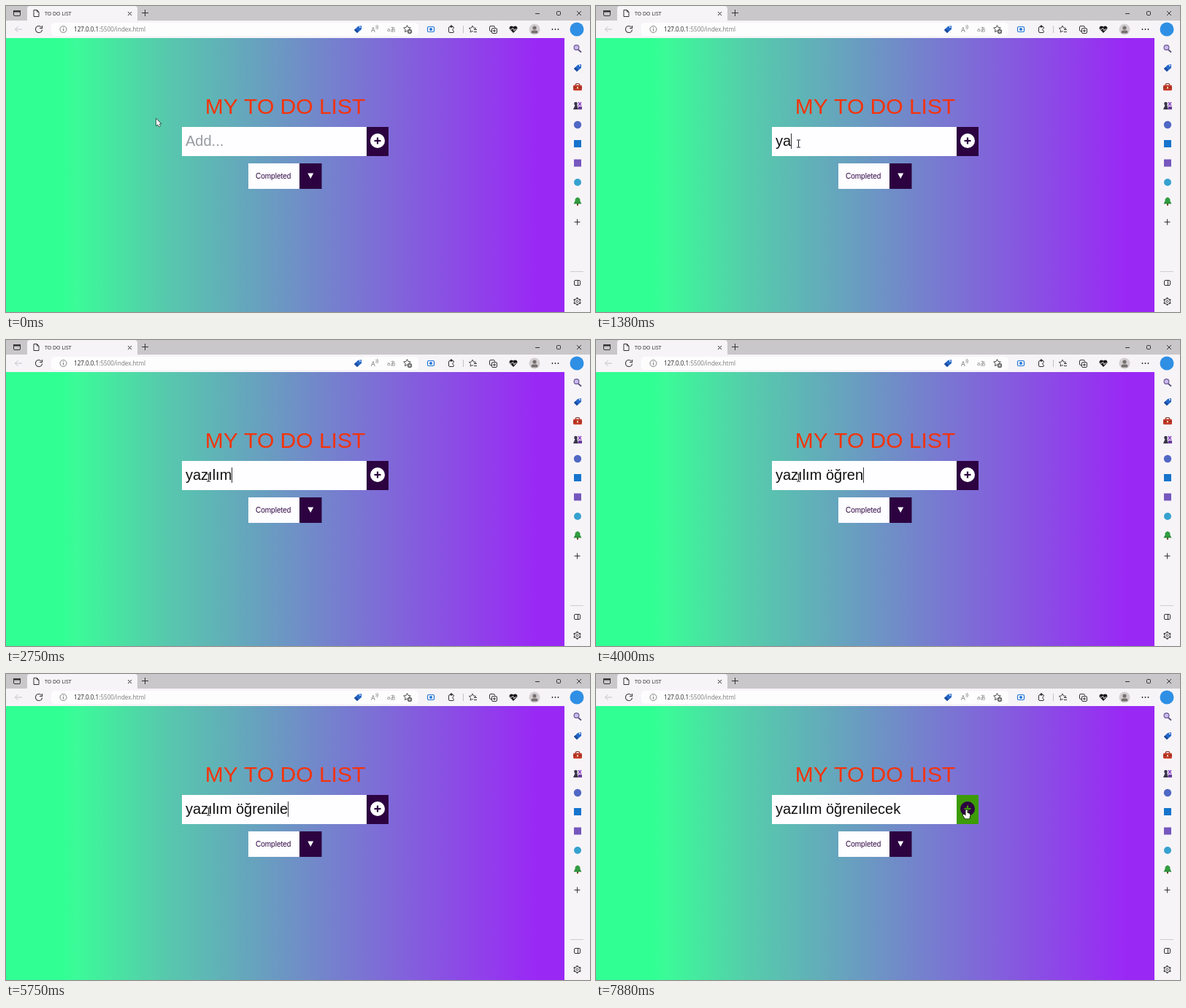
These frames come from a looping animation (800x420 px, 8000 ms). An HTML page with a canvas:

```html
<!DOCTYPE html>
<html lang="en">
<head>
<meta charset="utf-8">
<title>To do list</title>
<style>
html, body { margin: 0; width: 100%; height: 100%; overflow: hidden; }
canvas { display: block; width: 800px; height: 420px; }
</style>
</head>
<body>
<canvas id="stage" width="800" height="420"></canvas>
<script>
const ctx = document.getElementById('stage').getContext('2d');
const LOOP = 8000;
const SANS = '"Liberation Sans", Arial, sans-serif';
const UI = '"Open Sans", "Noto Sans", sans-serif';
const DARK = '#2c0340', INK = '#333', BAR = '#f7f4f8', GREEN = '#3d9b08';
const PHRASE = 'yazılım öğrenilecek';

// [time, typed length]
const KEYS = [[0, 0], [1250, 1], [1380, 2], [1500, 3], [1630, 4], [2380, 5], [2500, 6],
  [2750, 7], [3000, 8], [3500, 9], [3630, 10], [3750, 12], [4000, 13], [4630, 14],
  [5380, 15], [5750, 16], [6000, 17], [6130, 18], [6250, 19]];
const FOCUS = 1000;

function rect(x, y, w, h, color) {
  ctx.fillStyle = color;
  ctx.fillRect(x, y, w, h);
}
function box(x, y, w, h, r, color) {
  ctx.beginPath();
  ctx.roundRect(x, y, w, h, r);
  ctx.fillStyle = color;
  ctx.fill();
}
function frame(x, y, w, h, r, color = INK, lw = 1) {
  ctx.beginPath();
  ctx.roundRect(x, y, w, h, r);
  stroke(color, lw);
}
function stroke(color, lw) {
  ctx.strokeStyle = color;
  ctx.lineWidth = lw;
  ctx.stroke();
}
function disc(x, y, r, color) {
  ctx.beginPath();
  ctx.arc(x, y, r, 0, 7);
  ctx.fillStyle = color;
  ctx.fill();
}
function ring(x, y, r, color = INK, lw = 1, from = 0, to = Math.PI * 2) {
  ctx.beginPath();
  ctx.arc(x, y, r, from, to);
  stroke(color, lw);
}
function trace(pts, close) {
  ctx.beginPath();
  for (let i = 0; i < pts.length; i += 2) ctx.lineTo(pts[i], pts[i + 1]);
  if (close) ctx.closePath();
}
function line(pts, color = INK, lw = 1) {
  trace(pts);
  stroke(color, lw);
}
function poly(pts, color) {
  trace(pts, true);
  ctx.fillStyle = color;
  ctx.fill();
}
function text(s, x, y, size, color, family = SANS) {
  ctx.font = size + 'px ' + family;
  ctx.fillStyle = color;
  ctx.fillText(s, x, y);
  return ctx.measureText(s).width;
}
function plus(x, y, r, color = INK, lw = 1) {
  line([x - r, y, x + r, y], color, lw);
  line([x, y - r, x, y + r], color, lw);
}
function cross(x, y, r) {
  line([x - r, y - r, x + r, y + r]);
  line([x - r, y + r, x + r, y - r]);
}
function star(x, y, r) {
  const pts = [];
  for (let i = 0; i < 10; i++) {
    const a = i * Math.PI / 5 - Math.PI / 2, d = i % 2 ? r * 0.5 : r;
    pts.push(x + d * Math.cos(a), y + d * Math.sin(a));
  }
  trace(pts, true);
  stroke(INK, 0.9);
}
function tag(x, y) {
  poly([x - 5, y + 1, x, y - 4, x + 5, y - 5, x + 5, y, x - 1, y + 5], '#2468c8');
  poly([x - 5, y + 1, x - 3, y - 1, x + 1, y + 3, x - 1, y + 5], '#1c4a9a');
  disc(x + 3, y - 3, 0.9, '#fff');
}

function drawTabs() {
  rect(0, 0, 800, 20, '#cac7cb');
  box(29, 0, 151, 24, [4, 4, 0, 0], BAR);
  rect(0, 20, 800, 24, BAR);
  frame(10.5, 6.5, 9, 7, 1.5);
  rect(10, 6, 10, 2.5, INK);
  trace([38, 5.5, 42.5, 5.5, 45, 8, 45, 14.5, 38, 14.5], true);
  stroke(INK, 1);
  line([42.5, 5.5, 42.5, 8, 45, 8]);
  text('TO DO LIST', 53, 12.7, 7, '#222', UI);
  cross(169.5, 10.5, 2.5);
  plus(190.5, 9.5, 4.5);
  line([725, 10.5, 731, 10.5]);
  frame(754.5, 7.5, 5, 5, 1);
  cross(785, 10, 3);
}

function drawToolbar() {
  line([22, 32, 12.5, 32], '#c4c1c6');
  line([16.5, 28, 12.5, 32, 16.5, 36], '#c4c1c6');
  ring(45, 32, 4.5, INK, 1.1, 0.1, 5.5);
  line([49.5, 27, 49.5, 30.5, 46, 30.5], INK, 1.1);

  box(62, 23, 503, 18, 5, '#fefdfe');
  ring(78.5, 32, 4.5, '#777', 0.9);
  line([78.5, 31, 78.5, 34.5], '#777');
  rect(78, 29, 1, 1, '#777');
  const w = text('127.0.0.1', 93, 35, 8.1, '#222', UI);
  text(':5500/index.html', 93 + w, 35, 8.1, '#777', UI);

  tag(482, 32);
  text('A', 500, 35.5, 9, '#777', UI);
  ring(505, 29, 2.5, '#777', 0.8, -1, 1);
  ring(505, 29, 4.5, '#777', 0.8, -0.8, 0.8);
  text('aあ', 522, 35, 7.5, '#777', '"Open Sans", "Noto Sans CJK JP", sans-serif');
  star(549.5, 31.5, 5);
  disc(553, 35, 3.2, '#666');
  plus(553, 35, 1.7, '#fff', 0.8);

  frame(577.5, 28.5, 9, 7, 1.5, '#2176d8', 1.2);
  disc(582, 32, 2, '#2176d8');
  frame(606.5, 28.5, 7, 8, 1.5);
  disc(610, 28, 1.7, INK);
  disc(613.5, 32.5, 2.2, BAR);
  ring(613.5, 32.5, 1.7, INK, 1, 1.6, 4.7);
  line([626.5, 27, 626.5, 37], '#c4c1c6');
  star(639, 32, 5);
  rect(640, 32, 6, 5, BAR);
  line([641, 32.5, 645, 32.5]);
  line([641, 35.5, 645, 35.5]);
  frame(662.5, 27.5, 7, 7, 1.5);
  box(665, 29.5, 8, 8, 1.5, BAR);
  frame(665.5, 30.5, 7, 7, 1.5);
  plus(669, 34, 2);
  disc(692.5, 30.3, 2.9, '#171717');
  disc(697.5, 30.3, 2.9, '#171717');
  poly([689.8, 31.5, 700.2, 31.5, 695, 37], '#171717');
  line([690, 32, 693, 32, 694.5, 30, 696, 34, 697, 32, 700, 32], '#fff', 0.8);
  disc(724, 32, 7.5, '#d2ced1');
  disc(724, 30, 2.6, '#77706f');
  box(719.5, 33.5, 9, 4, [3, 3, 2, 2], '#77706f');
  for (const x of [748.5, 752.5, 756.5]) disc(x, 32, 0.9, '#222');
}

function drawSidebar() {
  rect(765, 44, 35, 376, BAR);
  disc(782, 32, 9.5, '#2f8fe4');

  line([784, 60, 788, 63.5], '#59507a', 1.8);
  disc(781.5, 57, 3.4, '#c9b9ee');
  ring(781.5, 57, 3.4, '#6b5a94', 1.2);
  tag(783, 85);
  frame(780.5, 106.5, 5, 4, 1, '#7d3025', 1.2);
  box(777, 108.5, 12, 7.5, 1.5, '#c63c2c');
  rect(777, 111.5, 12, 1, '#7d2418');
  rect(782, 111, 2, 2.5, '#f1c6a0');
  disc(780.5, 134, 2.3, '#39354a');
  poly([780, 135, 782, 135, 784, 142, 777, 142], '#39354a');
  line([784, 132, 788, 137], '#8a4ac4', 1.6);
  line([788, 132, 784, 137], '#8a4ac4', 1.6);
  rect(784, 138, 5, 4, '#6a3d9b');

  disc(783, 163, 5.2, '#5068c4');
  rect(778, 184, 10, 10, '#1674cc');
  rect(778, 210.5, 10, 10, '#7557bd');
  disc(783, 242, 5, '#36a2cf');

  rect(782, 269, 2, 5, '#7a4b27');
  poly([783, 262, 788.5, 271.5, 777.5, 271.5], '#278c36');
  disc(783, 266.5, 3.5, '#329d40');

  plus(782.5, 296.5, 4);
  line([773, 364.5, 791, 364.5], '#d0cdd1');
  frame(778.5, 376.5, 8, 7, 1.5);
  line([783.5, 376.5, 783.5, 383.5]);
  ring(782.5, 405.5, 4, INK, 1);
  for (let i = 0; i < 6; i++) {
    const c = Math.cos(i * Math.PI / 3 + 0.52), s = Math.sin(i * Math.PI / 3 + 0.52);
    line([782.5 + 4 * c, 405.5 + 4 * s, 782.5 + 5.5 * c, 405.5 + 5.5 * s], INK, 1.8);
  }
  ring(782.5, 405.5, 1.5, INK, 0.9);
}

function drawPage() {
  const g = ctx.createLinearGradient(0, 0, 765, 0);
  g.addColorStop(0.1, '#30ff94');
  g.addColorStop(0.125, '#3bfb98');
  g.addColorStop(0.27, '#55cdab');
  g.addColorStop(0.95, '#9a28f5');
  rect(0, 44, 765, 376, g);
  ctx.textAlign = 'center';
  text('MY TO DO LIST', 382.5, 147.5, 30, '#f5330a');
  ctx.textAlign = 'left';
  rect(332, 216, 70, 35, '#fefdff');
  rect(402, 216, 30.5, 35, DARK);
  text('Completed', 342, 237, 10, DARK);
  poly([413.3, 229.5, 421.2, 229.5, 417.2, 237], '#fff');
}

function drawInput(t, hover) {
  const [last, count] = KEYS.filter(k => k[0] <= t).pop();
  rect(241, 166, 253, 40, '#fefdff');
  let w = 0;
  if (count) w = text(PHRASE.slice(0, count), 246, 192.3, 20, '#111');
  else text('Add...', 246, 192.3, 20, '#969b9f');
  const since = t - Math.max(last, FOCUS);
  if (since >= 0 && since % 1000 < 500) rect(Math.floor(246 + w), 175, 1, 21, '#333');

  const back = hover ? GREEN : DARK;
  rect(494, 166, 30, 40, back);
  disc(509, 185, 10, hover ? DARK : '#fff');
  plus(509, 185, 4.5, back, 2.2);
}

function pointer(t) {
  const lerp = (a, b, p) => a + (b - a) * p;
  const ease = p => p * p * (3 - 2 * p);
  if (t < 7130) {
    const p = t < 250 ? 0 : ease(Math.min(1, (Math.floor((t - 250) / 125) + 1) / 3));
    return [lerp(206, 277, p), lerp(155, 189, p)];
  }
  const p = ease(Math.min(1, (Math.floor((t - 7130) / 125) + 1) / 7));
  return [lerp(277, 507.5, p), lerp(189, 186.5, p)];
}

function drawPointer(x, y, hover) {
  ctx.save();
  ctx.translate(x, y);
  if (hover) {
    trace([-1, 0, 1, 0, 1, 4, 4, 5, 5, 7, 4, 12, -2, 12, -5, 7, -3.5, 6, -1, 8], true);
    stroke('#111', 1.6);
    ctx.fillStyle = '#fff';
    ctx.fill();
  } else if (x > 241 && y > 166) {
    line([0.5, -4.5, 0.5, 4.5], '#222');
    line([-2, -5, 3, -5], '#222');
    line([-2, 5, 3, 5], '#222');
  } else {
    trace([0, 0, 0, 9, 2, 7.3, 3.5, 10.5, 5, 9.8, 3.7, 6.7, 6.2, 6.5], true);
    stroke('#222', 1.2);
    ctx.fillStyle = '#fff';
    ctx.fill();
  }
  ctx.restore();
}

function draw(now) {
  const t = now % LOOP;
  const [x, y] = pointer(t);
  const hover = x >= 494;
  drawPage();
  drawTabs();
  drawToolbar();
  drawSidebar();
  drawInput(t, hover);
  drawPointer(x, y, hover);
}

const start = performance.now();
function tick() {
  draw(performance.now() - start);
  requestAnimationFrame(tick);
}
tick();
</script>
</body>
</html>
```
